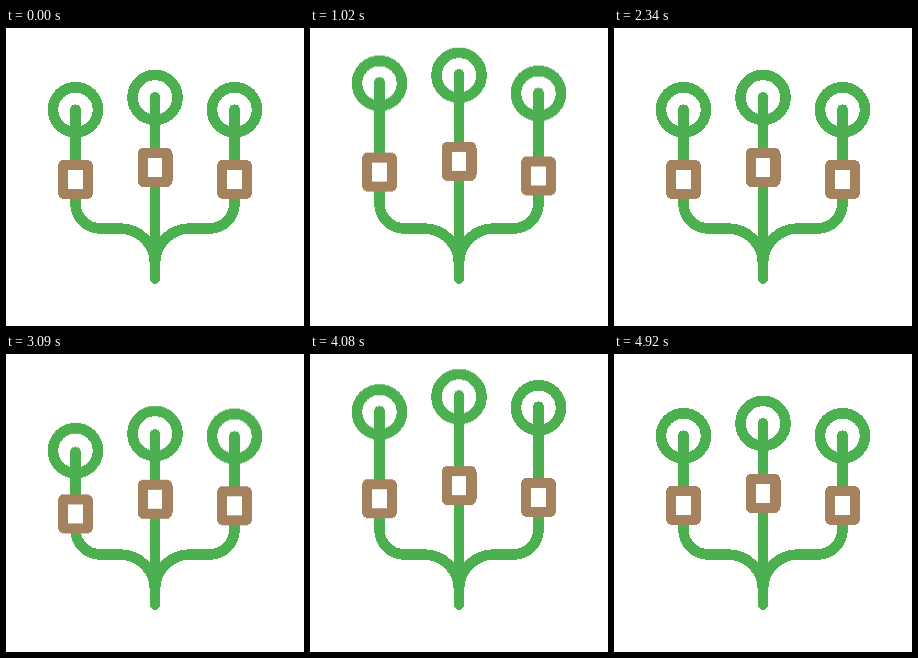
Recreate the animation shown at these times as an HTML page without scripts. Size 298 by 298 pixels, loop 5400 ms.

```html
<!DOCTYPE html>
<html lang="en">
<head>
<meta charset="utf-8">
<title>Growing plant</title>
<style>
  html, body { margin: 0; width: 100%; height: 100%; overflow: hidden; background: #fff; }
  svg { display: block; width: 100vw; height: 100vh; shape-rendering: crispEdges; }
  .green { fill: none; stroke: #4caf50; stroke-width: 10.6; stroke-linecap: round; }
  .knot { fill: #fff; stroke: #a5825e; stroke-width: 10.2; stroke-linejoin: round; }

  /* --down and --up: travel of each part from its resting place */
  .tip  { --down: 16.5px; --up: -29px; }
  .ring { --down: 15px; --up: -28px; }
  .knot { --down: 8.5px; --up: -8px; }
  .middle .ring { --up: -27px; }
  .middle .tip { --up: -28px; }
  .tip, .ring, .knot { animation: sway 5400ms var(--wait, 0ms) infinite both; }
  .middle { --wait: 120ms; }
  .right { --wait: 240ms; }

  /* dip, stretch, settle: played twice per loop */
  @keyframes sway {
    0%, 38.889%, 86.667%, 100% {
      transform: translateY(0);
      animation-timing-function: linear;
    }
    4.444%, 52.222% {
      transform: translateY(0);
      animation-timing-function: cubic-bezier(.33, 0, .4, 1);
    }
    10%, 57.778% {
      transform: translateY(var(--down));
      animation-timing-function: cubic-bezier(.15, 0, .1, 1);
    }
    22.222%, 70% {
      transform: translateY(var(--up));
      animation-timing-function: linear;
    }
    24.444%, 72.222% {
      transform: translateY(var(--up));
      animation-timing-function: cubic-bezier(.5, 0, .05, 1);
    }
  }
</style>
</head>
<body>
<svg viewBox="0 0 298 298">
  <g class="green">
    <path d="M69.5 110V175.5A25 25 0 0 0 94.5 200.5H114A35 35 0 0 1 149 235.5"/>
    <path d="M228.5 110V175.5A25 25 0 0 1 203.5 200.5H184A35 35 0 0 0 149 235.5"/>
    <path d="M149 97V250.5"/>
  </g>

  <g class="left">
    <circle class="green ring" cx="69.5" cy="81.7" r="22.5"/>
    <path class="green tip" d="M69.5 81.7V142"/>
    <rect class="knot" x="57.1" y="137" width="24.8" height="29" rx="1"/>
  </g>

  <g class="middle">
    <circle class="green ring" cx="149" cy="69.4" r="22.5"/>
    <path class="green tip" d="M149 69.4V130"/>
    <rect class="knot" x="136.6" y="124.9" width="24.8" height="29" rx="1"/>
  </g>

  <g class="right">
    <circle class="green ring" cx="228.5" cy="81.7" r="22.5"/>
    <path class="green tip" d="M228.5 81.7V142"/>
    <rect class="knot" x="216.1" y="137" width="24.8" height="29" rx="1"/>
  </g>
</svg>
</body>
</html>
```
